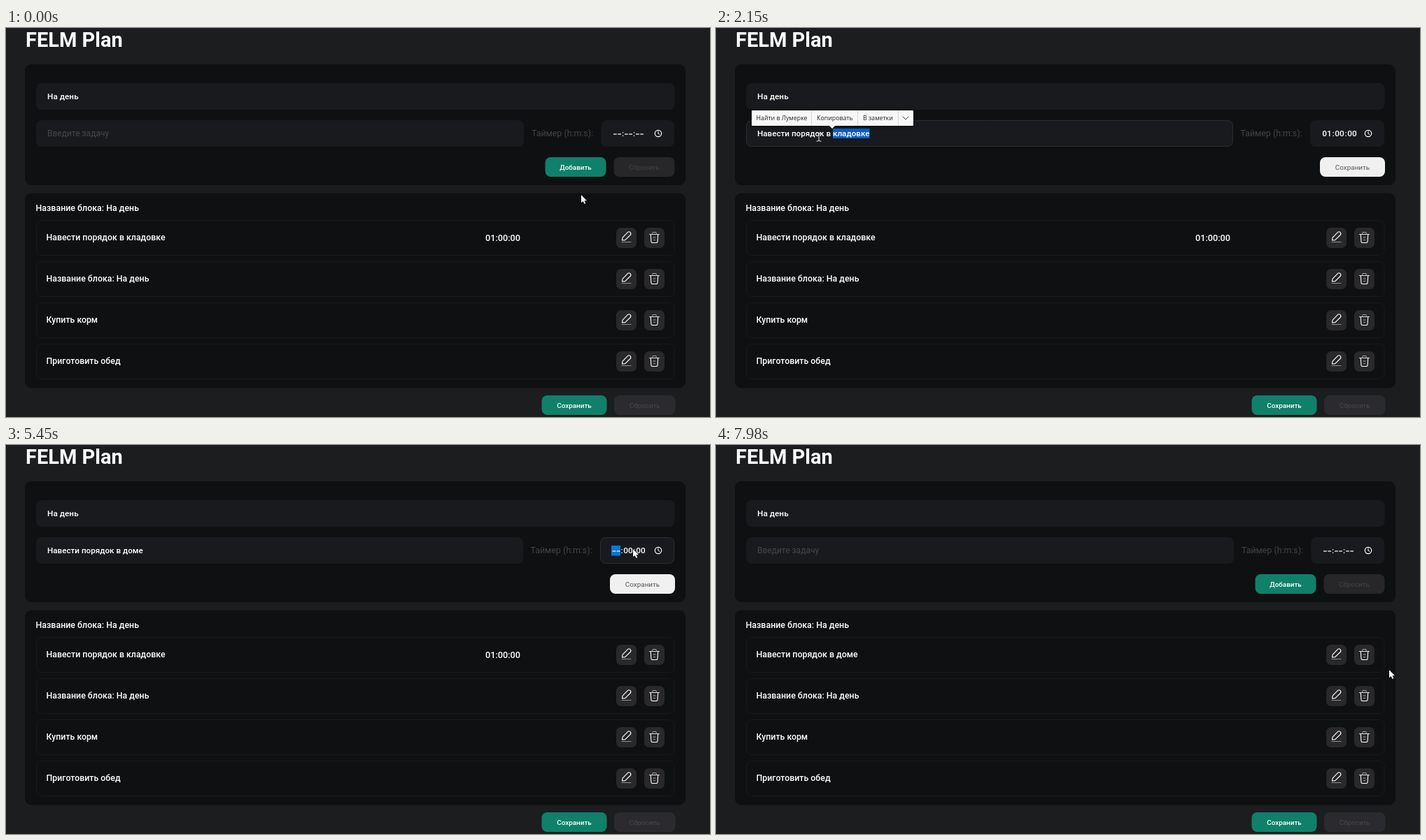
An HTML page with a canvas that plays this animation: 1006 px wide and 557 px high, repeating every 8 s.

```html
<!DOCTYPE html>
<html lang="ru">
<head>
<meta charset="utf-8">
<title>Задачи</title>
<style>
html, body { margin: 0; width: 100%; height: 100%; overflow: hidden; background: #1c1d1f; }
canvas { display: block; width: 1006px; height: 557px; }
</style>
</head>
<body>
<canvas id="stage"></canvas>
<script>
const LOOP = 8000, W = 1006, H = 557;
const UI = 'Roboto, sans-serif', POPUP = '"Open Sans", sans-serif';
const WHITE = '#fff', DIM = '#434448', FIELD = '#191a1d', PANEL = '#0f1011', GREEN = '#10806b', FOCUS = '#2c2e33';
const canvas = document.getElementById('stage');
const g = canvas.getContext('2d');
const dpr = window.devicePixelRatio || 1;
canvas.width = W * dpr;
canvas.height = H * dpr;

// Pointer path: time, x, y
const path = [
  [0, 822, 239], [29, 822, 239], [30, 814, 231], [200, 814, 231], [320, 905, 296], [370, 891, 299],
  [700, 891, 299], [1320, 251, 154], [1350, 250, 154], [1400, 250, 154],
  [1500, 222, 153], [1830, 169, 152.5], [2060, 169, 152.5], [2150, 147, 156],
  [3680, 147, 156], [4070, 890, 172], [4180, 885, 160], [4460, 874.5, 148],
  [5360, 874.5, 148], [5450, 896, 149], [5560, 891, 151], [5780, 891, 151],
  [5900, 906, 151], [6250, 906, 151], [6650, 918, 196], [7720, 918, 196], [7980, 962, 322]
];
// Intervals with the mouse button held
const presses = [[530, 660], [1500, 2060], [4550, 4800], [5580, 5700], [5930, 6050], [7130, 7330]];
const typed = [[2710, 'д'], [2970, 'о'], [3130, 'м'], [3350, 'е']];
const EDIT = 650, SAVE = 7400;

const within = (t, a, b) => t >= a && t < b;

function pointerAt(t) {
  let i = 0;
  while (i < path.length - 2 && path[i + 1][0] <= t) i++;
  const [t0, x0, y0] = path[i], [t1, x1, y1] = path[i + 1];
  let k = Math.min(1, Math.max(0, (t - t0) / (t1 - t0)));
  k = k * k * (3 - 2 * k);
  return { x: x0 + (x1 - x0) * k, y: y0 + (y1 - y0) * k };
}

function box(x, y, w, h, r, fill, stroke) {
  g.beginPath();
  g.roundRect(x, y, w, h, r);
  if (fill) { g.fillStyle = fill; g.fill(); }
  if (stroke) {
    g.beginPath();
    g.roundRect(x + 0.5, y + 0.5, w - 1, h - 1, r - 0.5);
    g.strokeStyle = stroke;
    g.lineWidth = 1;
    g.stroke();
  }
}

function text(s, x, cy, size, color = WHITE, weight = 500, align = 'left', family = UI) {
  g.font = `${weight} ${size}px ${family}`;
  g.textAlign = align;
  g.fillStyle = color;
  g.fillText(s, x, Math.round(cy + size * 0.355));
  return g.measureText(s).width;
}

function lines(d, color = WHITE, width = 1.1) {
  g.strokeStyle = color;
  g.lineWidth = width;
  g.lineCap = g.lineJoin = 'round';
  g.stroke(new Path2D(d));
}

function button(label, x, y, w, fill, color, weight = 400) {
  box(x, y, w, 28, 8, fill);
  text(label, x + w / 2, y + 14, 9.9, color, weight, 'center');
}

function at(x, y, draw) {
  g.save();
  g.translate(x, y);
  draw();
  g.restore();
}

function row(label, time, y, hover) {
  box(43, y, 912.5, 51, 8, null, '#191a1c');
  text(label, 57.5, y + 25, 12.35);
  if (time) text(time, 685, y + 25, 12.7);
  box(872, y + 11, 29, 29, 7, hover ? '#37383b' : '#29292c');
  box(912, y + 11, 29, 29, 7, '#29292c');
  at(886.5, y + 24, () => {
    lines('M-6 5 L-5.4 1.2 L1.6 -6.2 Q3.6 -8.2 5.5 -6.4 Q7.4 -4.5 5.5 -2.5 L-1.8 4.6 Z');
    lines('M-6.5 7.5 H6.5', '#8d8e90', 1);
  });
  at(926.5, y + 25, () => {
    lines('M-5.2 -4 L-4.6 5.5 Q-4.5 7.5 -2.8 7.5 H2.8 Q4.5 7.5 4.6 5.5 L5.2 -4');
    lines('M-7 -4.5 H7', '#dcdcdd', 1);
    lines('M-3 -5 L-2.4 -7.5 H2.4 L3 -5 M-1.5 0 H1.5 M-1 3.5 H1', '#a0a1a3', 1);
  });
}

function timeField(t, x) {
  const open = within(t, EDIT, SAVE);
  const focus = within(t, 4800, SAVE);
  const values = [
    within(t, EDIT, 5110) ? '01' : '', within(t, EDIT, 5750) ? '00' : '', within(t, EDIT, 6170) ? '00' : ''
  ];
  let active = -1;
  if (open && within(t, 4800, 6300)) active = t < 5580 ? 0 : t < 5930 ? 1 : 2;
  box(x, 132, 955 - x, 38, 8, FIELD, focus ? FOCUS : null);
  let sx = x + 17;
  values.forEach((v, i) => {
    const w = v ? 14 : 12;
    if (i === active) { g.fillStyle = '#0877d8'; g.fillRect(sx - 1, 144, w + 1, 14.5); }
    if (v) text(v, sx + w / 2, 151, 11.8, WHITE, 500, 'center');
    else {
      g.fillStyle = WHITE;
      g.fillRect(sx + 0.5, 151.4, 4.8, 1.2);
      g.fillRect(sx + 6.7, 151.4, 4.8, 1.2);
    }
    sx += w;
    if (i < 2) text(':', sx + 2, 151, 11.8, WHITE, 500, 'center');
    sx += 4;
  });
  at(932, 151, () => {
    g.beginPath();
    g.arc(0, 0, 4.7, 0, 7);
    g.strokeStyle = WHITE;
    g.lineWidth = 1.2;
    g.stroke();
    lines('M0 -3 V0.2 L2 1.4', WHITE, 1);
  });
}

function taskField(t, right, p) {
  const focus = within(t, 1500, 4800);
  box(43, 132, right - 43, 38, 8, FIELD, focus ? FOCUS : null);
  if (!within(t, EDIT, SAVE)) {
    text('Введите задачу', 59, 151, 12, '#46474b', 400);
    return;
  }
  const head = 'Навести порядок в ';
  const word = t < 2710 ? 'кладовке' : typed.filter(k => k[0] <= t).map(k => k[1]).join('');
  const hx = 59 + text(head, 59, 151, 11.65);
  const ww = g.measureText(word).width;
  if (within(t, 1500, 2710)) {
    // Selection grows leftwards, one letter at a time
    let from = word.length;
    while (from > 0 && hx + g.measureText(word.slice(0, from)).width > p.x + 3) from--;
    if (t >= 1800) from = 0;
    const off = g.measureText(word.slice(0, from)).width;
    g.fillStyle = '#0b5dc4';
    g.fillRect(hx + off, 144, ww - off, 14);
  }
  text(word, hx, 151, 11.65);
  if (within(t, 2710, 3880) || within(t, 4490, 4800)) {
    g.fillStyle = WHITE;
    g.fillRect(Math.round(hx + ww), 144, 1, 14);
  }
}

function popup() {
  g.save();
  g.shadowColor = 'rgba(0,0,0,.5)';
  g.shadowBlur = 5;
  g.shadowOffsetY = 1;
  box(51, 118, 231, 22, 1, '#f8f8f8');
  g.restore();
  g.fillStyle = '#f8f8f8';
  g.fill(new Path2D('M161 139 H171 L166 144 Z'));
  g.fillStyle = '#d6d6d6';
  [136, 202, 260].forEach(x => g.fillRect(x, 118, 1, 22));
  [['Найти в Лумерке', 57.5], ['Копировать', 144], ['В заметки', 210]]
    .forEach(([s, x]) => text(s, x, 128.7, 8.8, '#222', 400, 'left', POPUP));
  lines('M267 127 L271 131 L275 127', '#444', 1);
}

function pointer(t, p) {
  if (presses.some(([a, b]) => within(t, a, b))) {
    g.fillStyle = 'rgba(255,240,10,.53)';
    g.beginPath();
    g.arc(p.x, p.y, 9.2, 0, 7);
    g.fill();
  }
  const over = (x, y, w, h) => p.x >= x && p.x <= x + w && p.y >= y && p.y <= y + h;
  const editing = within(t, EDIT, SAVE);
  at(p.x, p.y, () => {
    if (over(43, 132, 697, 38)) {
      lines('M-3 -6 H-1 L0 -5 L1 -6 H3 M0 -5 V5 M-3 6 H-1 L0 5 L1 6 H3', '#e8e8e8', 1);
      return;
    }
    const hand = over(872, 286, 29, 29) || over(912, 286, 29, 29) || (editing && over(863, 185, 92, 28));
    const shape = new Path2D(hand
      ? 'M-1.3 0 Q0 -1.4 1.3 0 V5 L3 4.8 L4 5.7 L5.5 5.5 L6.3 6.6 L8 7 V11 L6.5 14 V16 H-0.5 V14 L-4 9 Q-4 7 -1.3 9 Z'
      : 'M0 0 V11.3 L2.6 9 L4.5 13 L6.3 12.1 L4.5 8.2 H8 Z');
    g.lineWidth = 1;
    g.strokeStyle = '#000';
    g.stroke(shape);
    g.fillStyle = WHITE;
    g.fill(shape);
  });
}

function draw(t) {
  const p = pointerAt(t);
  const editing = within(t, EDIT, SAVE);
  const filled = within(t, EDIT, 6170);
  g.setTransform(dpr, 0, 0, dpr, 0, 0);
  g.fillStyle = '#1c1d1f';
  g.fillRect(0, 0, W, H);
  text('FELM Plan', 28, 17, 29, WHITE, 700);

  box(27, 52, 944, 173, 9, PANEL);
  box(43, 79, 912.5, 38, 8, FIELD);
  text('На день', 59, 98, 11.8);
  taskField(t, filled ? 739 : 740, p);
  text('Таймер (h:m:s):', filled ? 749.5 : 751, 151, 12.4, DIM, 400);
  timeField(t, filled ? 849 : 850.5);
  if (editing) {
    const hover = p.y >= 185 && p.y <= 213 && p.x >= 863 && p.x <= 955;
    button('Сохранить', 863, 185, 93, hover ? '#1f2026' : '#f0f0f1', hover ? '#3d3e43' : '#55565a');
  } else {
    button('Добавить', 770.5, 185, 87, GREEN, WHITE, 500);
    button('Сбросить', 868.5, 185, 87, '#27272a', DIM);
  }

  box(27, 236.5, 944, 279, 9, PANEL);
  text('Название блока: На день', 42.5, 257.5, 12.4);
  const saved = t >= SAVE;
  const onPencil = p.x >= 872 && p.x <= 901 && p.y >= 286 && p.y <= 315;
  row(saved ? 'Навести порядок в доме' : 'Навести порядок в кладовке', saved ? '' : '01:00:00', 275, onPencil);
  ['Название блока: На день', 'Купить корм', 'Приготовить обед']
    .forEach((s, i) => row(s, '', 334 + i * 59));
  button('Сохранить', 765.5, 526, 93, GREEN, WHITE, 500);
  button('Сбросить', 869, 526, 87.5, '#2b2b2f', '#47484d');

  if (within(t, 2090, 2710)) popup();
  pointer(t, p);
}

const start = performance.now();
function tick() {
  draw((performance.now() - start) % LOOP);
  requestAnimationFrame(tick);
}
tick();
</script>
</body>
</html>
```
